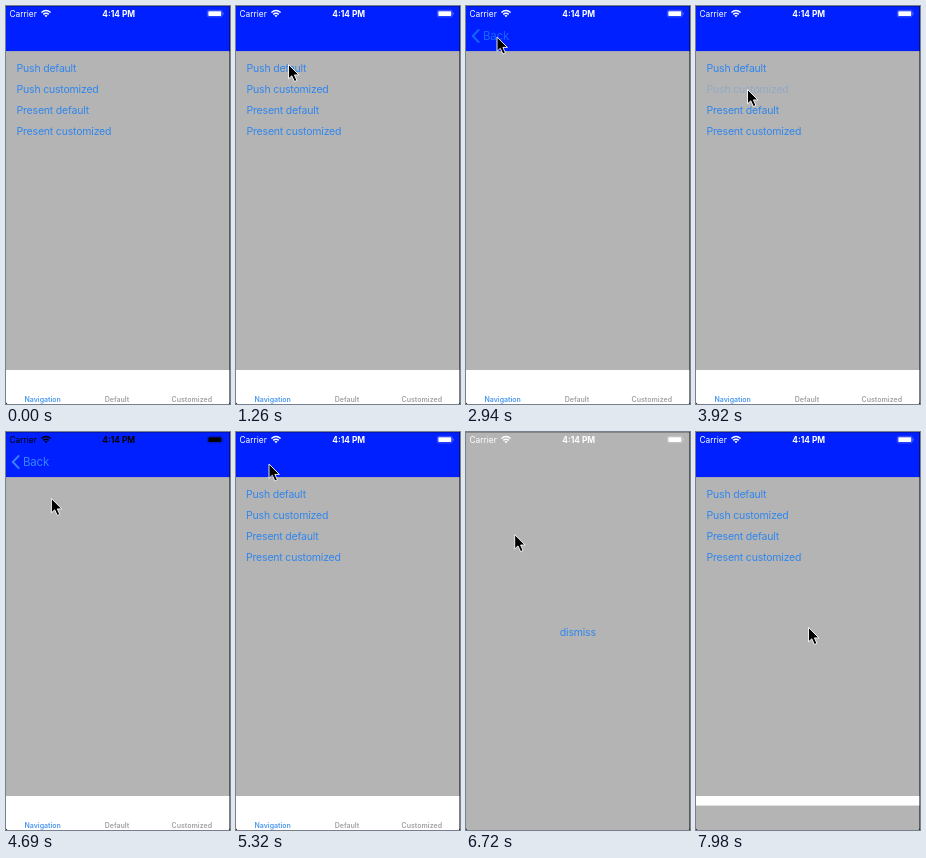
An HTML page that plays this animation: 224 by 398 pixels, repeating every 8 s.

```html
<!DOCTYPE html>
<html lang="en">
<head>
<meta charset="utf-8">
<title>Navigation demo</title>
<style>
  html, body { margin: 0; width: 100%; height: 100%; overflow: hidden; background: #b4b4b4; }
  svg { display: block; width: 100vw; height: 100vh; font-family: Inter, Roboto, "Open Sans", sans-serif; }
  .link { font-size: 10.5px; letter-spacing: -.018em; fill: #2f86ee; }
  .tab { font-size: 7px; font-weight: 600; fill: #a0a0a0; text-anchor: middle; }
  .tab.on { fill: #4a97ee; }
</style>
</head>
<body>
<svg viewBox="0 0 224 398" preserveAspectRatio="none">
  <rect width="224" height="398" fill="#b4b4b4"/>
  <g id="list">
    <text class="link" x="10.5" y="65.6">Push default</text>
    <text class="link" x="10.5" y="86.6">Push customized</text>
    <text class="link" x="10.5" y="107.6">Present default</text>
    <text class="link" x="10.5" y="128.6">Present customized</text>
  </g>
  <rect id="page" y="45" width="224" height="319" fill="#b4b4b4"/>

  <rect width="224" height="45" fill="#0020ff"/>
  <rect y="45" width="224" height="1" fill="#a6a6b4"/>
  <g id="back">
    <path d="M13.2 23.4L6.8 30L13.2 36.6" fill="none" stroke="currentColor" stroke-width="1.9"/>
    <text id="backText" x="17" y="34" font-size="11.5" letter-spacing="-.2" fill="currentColor">Back</text>
  </g>

  <rect y="364" width="224" height="34" fill="#fff"/>
  <text class="tab on" x="36.7" y="395.8">Navigation</text>
  <text class="tab" x="111" y="395.8">Default</text>
  <text class="tab" x="185.8" y="395.8">Customized</text>

  <g id="modal">
    <rect width="224" height="398" fill="#b4b4b4"/>
    <text id="dismiss" class="link" x="111.8" y="203.5" text-anchor="middle">dismiss</text>
  </g>

  <g id="status" fill="currentColor">
    <text x="3.5" y="10.8" font-size="8.4">Carrier</text>
    <g fill="none" stroke="currentColor" stroke-width="1.5">
      <path d="M35.4 6.5Q40 2.6 44.6 6.5"/>
      <path d="M37.2 8.4Q40 6 42.8 8.4"/>
    </g>
    <path d="M38.4 9.6Q40 8.4 41.6 9.6L40 11.3Z"/>
    <text x="112.7" y="10.8" font-size="8.4" font-weight="700" text-anchor="middle">4:14 PM</text>
    <rect x="201.3" y="4.3" width="15" height="6.6" rx="1.6" fill="none" stroke="currentColor" stroke-width=".6" stroke-opacity=".4"/>
    <rect x="202.3" y="5.2" width="13" height="4.8" rx=".8"/>
    <path d="M217.3 6.4Q218.6 7.6 217.3 8.8Z" opacity=".6"/>
  </g>

  <path d="M223.5 0V398" stroke="#000" stroke-opacity=".5"/>
  <path d="M0 .5H224" stroke="#000" stroke-opacity=".25"/>
  <path d="M0 396.6L1.4 398H0ZM224 396.6L222.6 398H224Z" fill="#222"/>

  <path id="cursor" d="M0 0V14.3L3.3 11.3L5.9 17L8.4 15.9L5.9 10.4H10.4Z" fill="#000" stroke="#fff" stroke-width=".9" stroke-linejoin="round"/>
</svg>
<script>
const LOOP = 8000, STEP = 70, W = 224, H = 398;
const $ = id => document.getElementById(id);
const links = [...document.querySelectorAll('#list .link')];

const clamp = v => Math.max(0, Math.min(1, v));
const smooth = v => v * v * (3 - 2 * v);
const mix = (a, b, k) => a + (b - a) * k;

// critically damped spring from 0 to 1
function spring(t, start, w) {
  const x = Math.max(0, t - start) / 1000 * w;
  return 1 - (1 + x) * Math.exp(-x);
}

// start, end, x, y: each move begins where the previous one stopped
const moves = [
  [0, 0, 232, 290],
  [700, 1260, 52.5, 58.5],
  [2240, 2600, 31, 31],
  [3570, 3850, 51.5, 83.5],
  [4550, 4914, 33, 32],
  [5390, 5830, 48.7, 102.6],
  [7140, 7350, 112.5, 195.5]
];

// element, press, release
const taps = [
  [links[0], 1400, 1540],
  [links[1], 3850, 3970],
  [links[2], 5830, 5900],
  [$('dismiss'), 7490, 7660]
];

function cursorAt(t) {
  let [, , x, y] = moves[0];
  for (const [a, b, tx, ty] of moves.slice(1)) {
    const k = smooth(clamp((t - a) / (b - a)));
    x = mix(x, tx, k);
    y = mix(y, ty, k);
  }
  return [x, y];
}

function draw(t) {
  const custom = t >= 3800;
  const pushed = custom
    ? spring(t, 3960, 18) - spring(t, 4930, 18)
    : spring(t, 1560, 18) - spring(t, 3010, 18);
  const p = clamp(pushed);
  $('list').setAttribute('transform', `translate(${-W * .3 * p})`);
  $('page').setAttribute('x', W * (1 - p));

  $('back').style.opacity = p * p;
  $('back').style.color = custom ? '#3a84ff' : '#1468ff';
  $('backText').setAttribute('x', mix(90, 17, p));

  const shown = spring(t, 6030, 38) - spring(t, 7770, 21.4);
  $('modal').setAttribute('transform', `translate(0 ${H * (1 - shown)})`);

  const dark = clamp((t - 3990) / 300) - clamp((t - 4960) / 300);
  const c = Math.round(255 * (1 - dark));
  $('status').style.color = `rgb(${c},${c},${c})`;

  for (const [el, on, off] of taps) {
    el.style.opacity = t < on ? 1 : mix(.25, 1, clamp((t - off) / 110));
  }

  const [x, y] = cursorAt(t);
  $('cursor').setAttribute('transform', `translate(${x} ${y})`);
}

const begin = performance.now();
function tick() {
  const t = (performance.now() - begin) % LOOP;
  draw(Math.floor(t / STEP) * STEP);
  requestAnimationFrame(tick);
}
draw(0);
requestAnimationFrame(tick);
</script>
</body>
</html>
```
